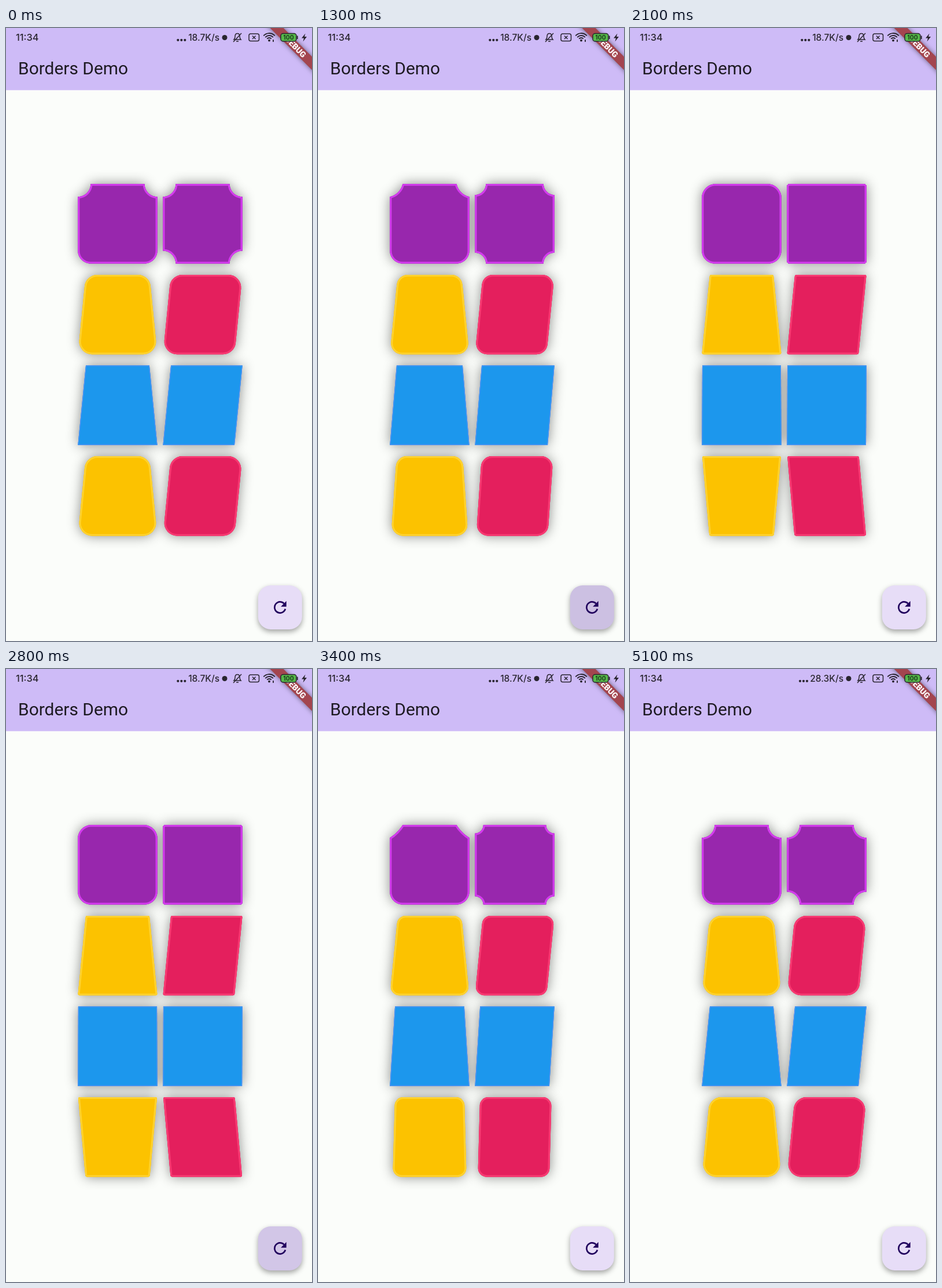
These frames come from a looping animation (529x1058 px, 5200 ms). An HTML page with a canvas:

```html
<!DOCTYPE html>
<html lang="en">
<head>
<meta charset="utf-8">
<title>Borders Demo</title>
<style>
  html, body { margin: 0; width: 100%; height: 100%; overflow: hidden; background: #fbfdfa; }
  canvas { display: block; width: 100%; height: 100%; }
</style>
</head>
<body>
<canvas id="stage" width="529" height="1058"></canvas>
<script>
const ctx = document.getElementById('stage').getContext('2d');
const W = 529, H = 1058, LOOP = 5200, STEP = 100;
const MORPH = 1000, TAPS = [1150, 2760], SPEED_CHANGE = 4700;
const INK = '#29252f', R = 22, SLANT = 13.7, K = 0.5523;
const SIZE = 137.3, LEFT = 124.3, RIGHT = 271.4, TOP = 269.3, PITCH = 156.6;

const clamp = v => Math.max(0, Math.min(1, v));
const mix = (a, b, p) => a + (b - a) * p;

// 0 = first set of borders, 1 = second set
function morphAt(t) {
  return clamp((t - TAPS[0]) / MORPH) - clamp((t - TAPS[1]) / MORPH);
}

// Button highlight: rises around the tap, then fades
function pressAt(t) {
  return Math.max(...TAPS.map(tap => {
    const d = t - tap;
    return Math.min(clamp((d + 150) / 240), clamp((450 - d) / 250));
  }));
}

// corners: four {r, bend} from top left, clockwise; bend 0 = scooped, 1 = round
function cornerBox(x, y, corners) {
  const path = new Path2D(), s = SIZE;
  const pts = [[x, y, 0, 1, 1, 0], [x + s, y, -1, 0, 0, 1],
               [x + s, y + s, 0, -1, -1, 0], [x, y + s, 1, 0, 0, -1]];
  pts.forEach(([cx, cy, ax, ay, bx, by], i) => {
    const { r, bend } = corners[i];
    const at = (a, b) => [cx + (ax * a + bx * b) * r, cy + (ay * a + by * b) * r];
    const c1 = at(mix(1, 1 - K, bend), mix(K, 0, bend));
    const c2 = at(mix(K, 0, bend), mix(1, 1 - K, bend));
    const start = at(1, 0);
    if (i) path.lineTo(...start); else path.moveTo(...start);
    path.bezierCurveTo(...c1, ...c2, ...at(0, 1));
  });
  path.closePath();
  return path;
}

// insets: how far each corner moves inward, from top left, clockwise
function quad(x, y, insets, r) {
  const [a, b, c, d] = insets, s = SIZE;
  const pts = [[x + a, y], [x + s - b, y], [x + s - c, y + s], [x + d, y + s]];
  const path = new Path2D();
  path.moveTo((pts[0][0] + pts[1][0]) / 2, y);
  for (let i = 1; i <= 4; i++) path.arcTo(...pts[i % 4], ...pts[(i + 1) % 4], r);
  path.closePath();
  return path;
}

function tiles(p) {
  const purple = ['#9827ad', '#d53cef', 3], amber = ['#fcc200', '#ffd22f', 3];
  const pink = ['#e41f5d', '#f83a72', 3], blue = ['#1c97ed', '#4f90f6', 1.2];
  const r = mix(R, 1.8, p), out = SLANT * (1 - p), back = SLANT * p;
  const round = { r: R, bend: 1 }, top = { r: R, bend: p };
  const scoop = { r: mix(R, 1, p), bend: 0 };
  const row = i => TOP + PITCH * i;
  return [
    [cornerBox(LEFT, row(0), [top, top, round, round]), purple],
    [cornerBox(RIGHT, row(0), [scoop, scoop, scoop, scoop]), purple],
    [quad(LEFT, row(1), [SLANT, SLANT, 0, 0], r), amber],
    [quad(RIGHT, row(1), [SLANT, 0, SLANT, 0], r), pink],
    [quad(LEFT, row(2), [out, out, 0, 0], 0), blue],
    [quad(RIGHT, row(2), [out, 0, out, 0], 0), blue],
    [quad(LEFT, row(3), [out, out, back, back], r), amber],
    [quad(RIGHT, row(3), [out, back, out, back], r), pink]
  ];
}

function shadow(color, blur, dy = 0) {
  ctx.shadowColor = color;
  ctx.shadowBlur = blur;
  ctx.shadowOffsetY = dy;
}

function drawTiles(p) {
  const list = tiles(p);
  ctx.save();
  shadow('rgba(0,0,0,.46)', 21);
  for (const [path, [fill]] of list) {
    ctx.fillStyle = fill;
    ctx.fill(path);
  }
  ctx.restore();
  for (const [path, [fill, edge, width]] of list) {
    ctx.save();
    ctx.fillStyle = fill;
    ctx.fill(path);
    ctx.clip(path);
    ctx.strokeStyle = edge;
    ctx.lineWidth = width * 2;
    ctx.stroke(path);
    ctx.restore();
  }
}

function text(str, x, y, font, color = INK, align = 'left') {
  ctx.font = font;
  ctx.fillStyle = color;
  ctx.textAlign = align;
  ctx.fillText(str, x, y);
}

function dot(x, y, r) {
  ctx.beginPath();
  ctx.arc(x, y, r, 0, Math.PI * 2);
  ctx.fill();
}

function line(...pts) {
  ctx.beginPath();
  pts.forEach(pt => ctx.lineTo(...pt));
  ctx.stroke();
}

function polygon(...pts) {
  ctx.beginPath();
  pts.forEach(pt => ctx.lineTo(...pt));
  ctx.closePath();
  ctx.fill();
}

function roundBox(x, y, w, h, r) {
  ctx.beginPath();
  ctx.roundRect(x, y, w, h, r);
}

function drawRibbon() {
  ctx.save();
  ctx.translate(W + 4.5, 0);
  ctx.rotate(Math.PI / 4);
  ctx.save();
  shadow('rgba(0,0,0,.5)', 8);
  ctx.fillStyle = '#a3454f';
  ctx.fillRect(-75, 38.1, 150, 16.3);
  ctx.restore();
  text('DEBUG', 0, 51.2, '900 13.9px Roboto, sans-serif', '#fff', 'center');
  ctx.restore();
}

function drawBell() {
  ctx.beginPath();
  ctx.moveTo(394, 20);
  ctx.quadraticCurveTo(396, 18, 396, 14.5);
  ctx.quadraticCurveTo(396, 9.5, 400, 9.5);
  ctx.quadraticCurveTo(404, 9.5, 404, 14.5);
  ctx.quadraticCurveTo(404, 18, 406, 20);
  ctx.closePath();
  ctx.stroke();
  line([398, 23], [402, 23]);
  line([393, 24], [407, 9]);
}

function drawWifi() {
  for (const r of [5, 9, 13]) {
    ctx.beginPath();
    ctx.arc(455, 22, r, -Math.PI * 0.77, -Math.PI * 0.23);
    ctx.stroke();
  }
  dot(455, 21.5, 1.9);
  line([462, 20], [462, 24]);
}

function drawBattery() {
  roundBox(475, 9.5, 27, 13.5, 4);
  ctx.fillStyle = '#55b749';
  ctx.fill();
  ctx.stroke();
  ctx.fillStyle = INK;
  ctx.fillRect(503, 13.5, 1.6, 5.5);
  text('100', 488.5, 20.2, '600 10.5px Inter, sans-serif', '#18301a', 'center');
  ctx.fillStyle = INK;
  polygon([517.5, 9.5], [511, 17.5], [515, 17.5], [513.5, 23.5], [520, 15], [516, 15]);
}

function drawStatus(t) {
  const late = t >= SPEED_CHANGE;
  text('11:34', 17, 22.3, '500 16.4px Inter, sans-serif');
  text(late ? '28.3K/s' : '18.7K/s', 369, 22, '500 15.5px Inter, sans-serif', INK, 'right');
  for (let i = 0; i < 3; i++) dot((late ? 294 : 297.3) + i * 6, 20.8, 2.1);
  dot(378, 16.5, 4.5);

  ctx.strokeStyle = INK;
  ctx.lineWidth = 1.5;
  drawBell();
  roundBox(420, 10, 17.5, 12.5, 3);
  ctx.stroke();
  line([426, 13.5], [431.5, 19]);
  line([431.5, 13.5], [426, 19]);
  ctx.lineWidth = 1.8;
  drawWifi();
  ctx.lineWidth = 1.5;
  drawBattery();
}

function drawButton(press) {
  ctx.save();
  shadow('rgba(0,0,0,.36)', 10, 4);
  roundBox(435.8, 962, 76, 76, 21.8);
  ctx.fillStyle = '#e7ddf7';
  ctx.fill();
  ctx.restore();
  ctx.fillStyle = `rgba(33,0,93,${0.135 * press})`;
  ctx.fill();

  ctx.save();
  ctx.translate(473.8, 1000);
  ctx.scale(1.36, 1.36);
  ctx.strokeStyle = ctx.fillStyle = '#21005d';
  ctx.lineWidth = 2;
  ctx.beginPath();
  ctx.arc(0, 0, 7, 0.29, Math.PI * 1.75);
  ctx.stroke();
  polygon([1, -1], [8, -1], [8, -8]);
  ctx.restore();
}

function draw(t) {
  ctx.fillStyle = '#fbfdfa';
  ctx.fillRect(0, 0, W, H);
  ctx.fillStyle = '#cebbf7';
  ctx.fillRect(0, 0, W, 107.3);
  text('Borders Demo', 21.1, 79.9, '400 29.9px Roboto, sans-serif', '#1d1a22');
  drawTiles(morphAt(t));
  drawButton(pressAt(t));
  drawRibbon();
  drawStatus(t);
}

const origin = performance.now();
function tick() {
  const t = (performance.now() - origin) % LOOP;
  draw(Math.floor(t / STEP) * STEP);
  requestAnimationFrame(tick);
}
tick();
</script>
</body>
</html>
```
